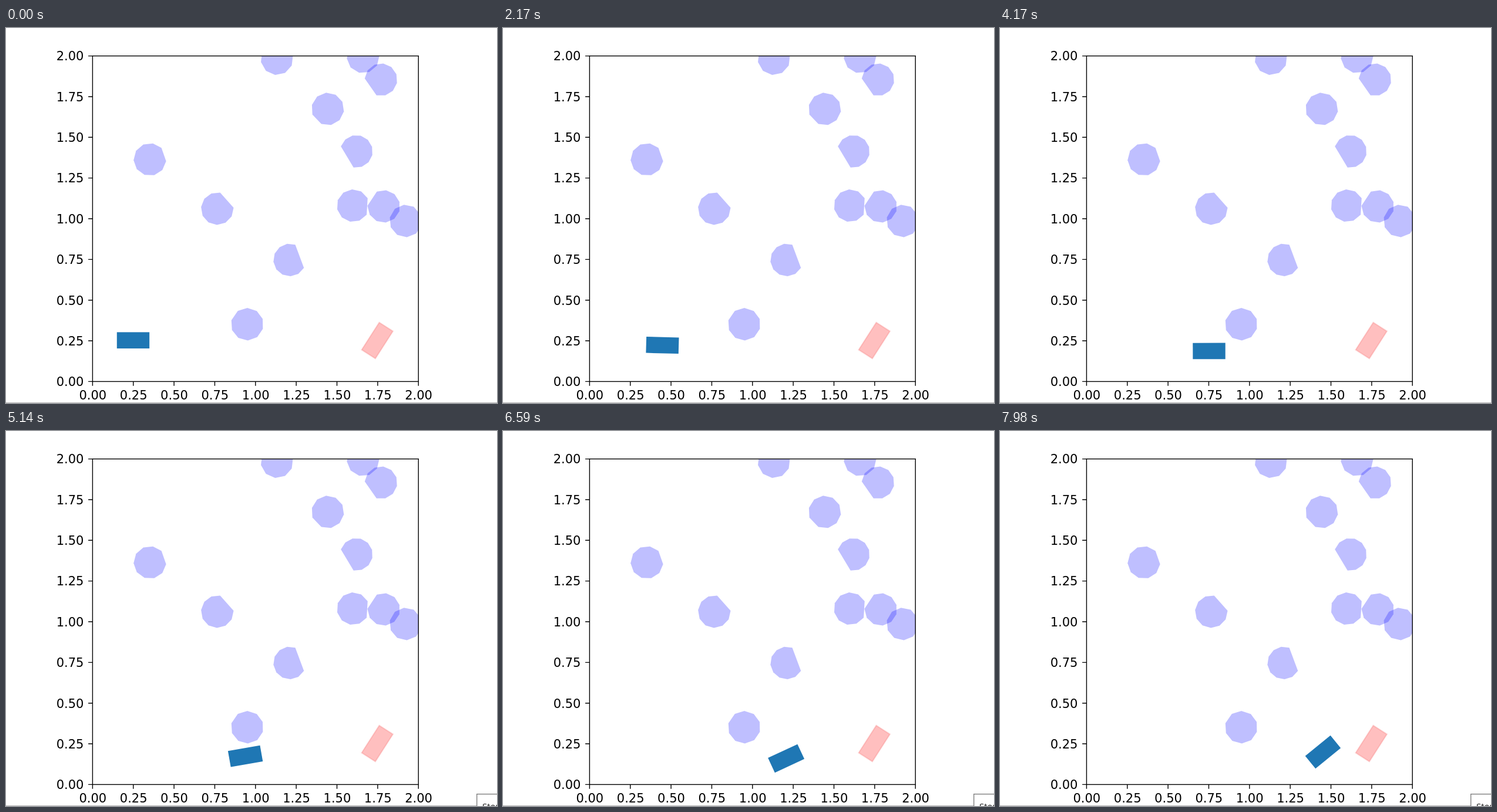
These frames come from a looping animation (836 by 639 pixels, 8000 ms). An HTML page:

```html
<!DOCTYPE html>
<html lang="en">
<head>
<meta charset="utf-8">
<title>Path planner plot</title>
<style>
  html, body { margin: 0; width: 100%; height: 100%; overflow: hidden; background: #fff; }
  svg { display: block; }
  .label { font: 21px "DejaVu Sans", sans-serif; }
  .tip { font: 15px "Open Sans", sans-serif; }
</style>
</head>
<body>
<svg width="836" height="639" viewBox="0 0 836 639">
  <defs>
    <clipPath id="plot"><rect x="147.4" y="47.6" width="554.8" height="554.8"/></clipPath>
    <rect id="body" x="-27.7" y="-13.85" width="55.4" height="27.7"/>
  </defs>
  <g id="obstacles" clip-path="url(#plot)" fill="#00f" fill-opacity=".25"></g>
  <use href="#body" transform="translate(632.2 532.5) rotate(-57.3)"
    fill="red" fill-opacity=".25" stroke="#f46060" stroke-opacity=".25" stroke-width="2.1"/>
  <use id="car" href="#body" fill="#1f77b4"/>
  <g id="axes" stroke="#000" stroke-width="1.4" fill="none">
    <rect x="147.4" y="47.6" width="554.8" height="554.8"/>
  </g>
  <g id="labels" class="label"></g>
  <rect y="638" width="836" height="1" fill="#b4b4b4"/>
  <g id="tip">
    <rect x="801.7" y="618.7" width="60" height="40" fill="#fff" stroke="#808080" stroke-width="1.4"/>
    <text class="tip" x="811" y="644.5" fill="#222">Stop</text>
  </g>
</svg>
<script>
const $ = id => document.getElementById(id);
const LEFT = 147.4, TOP = 47.6, SIZE = 554.8, RADIUS = 27.8;
const LOOP = 8000, START = 990, STEP = 69.1;

function add(parent, name, attrs, text = '') {
  const el = document.createElementNS('http://www.w3.org/2000/svg', name);
  for (const key in attrs) el.setAttribute(key, attrs[key]);
  el.textContent = text;
  parent.append(el);
}

// A circle of short even sides with one long side between two angles
function blob(x, y, from, to, sides = 9) {
  const points = Array.from({ length: sides + 1 }, (_, i) => {
    const a = (to + (360 + from - to) * i / sides) * Math.PI / 180;
    return [x + RADIUS * Math.cos(a), y + RADIUS * Math.sin(a)];
  });
  add($('obstacles'), 'polygon', { points: points.join(' ') });
}

blob(461.3, 52.3, 25, 60);
blob(608, 49.3, 140, 175);
blob(638.5, 88, 106, 184);
blob(547.8, 138, 113, 160);
blob(596.6, 210.3, 100, 198);
blob(245, 224, -45, 6);
blob(359.8, 307.8, -80, -3);
blob(591, 302.7, -27, 34);
blob(643.2, 304, 182, 245);
blob(680.7, 328.8, -61, -20);
blob(483, 395.3, -70, 29);
blob(410.7, 504.7, 194, 235);

for (let i = 0; i <= 8; i++) {
  const x = LEFT + SIZE * i / 8, y = TOP + SIZE * (1 - i / 8), text = (i / 4).toFixed(2);
  add($('axes'), 'path', { d: `M${x} ${TOP + SIZE}v7.3M${LEFT} ${y}h-7.3` });
  add($('labels'), 'text', { x: x + .4, y: 633, 'text-anchor': 'middle' }, text);
  add($('labels'), 'text', { x: 132.4, y: y + 7.8, 'text-anchor': 'end' }, text);
}

// Drift slightly right, pause one step, then steer steadily left
function pose(step) {
  if (step <= 40) {
    const u = (step + 1) / 41;
    return [216.5 + 120.7 * u + 8 * u * (1 - u), 532.2 + 17.8 * u + 2 * u * (1 - u), 3.5 * u];
  }
  const u = (step - 41) / 60;
  return [
    337.2 + 212.7 * u + 14 * u * (1 - u),
    550 + u * (1.1 + u * (56.8 - 61 * u)),
    3.5 - 42.7 * u
  ];
}

function draw(now) {
  const t = now % LOOP;
  const step = Math.max(-1, Math.floor((t - START) / STEP));
  const [x, y, angle] = pose(step);
  $('car').setAttribute('transform', `translate(${x} ${y}) rotate(${angle})`);
  $('tip').setAttribute('visibility', t >= 4930 ? 'visible' : 'hidden');
  requestAnimationFrame(draw);
}
draw(performance.now());
</script>
</body>
</html>
```
